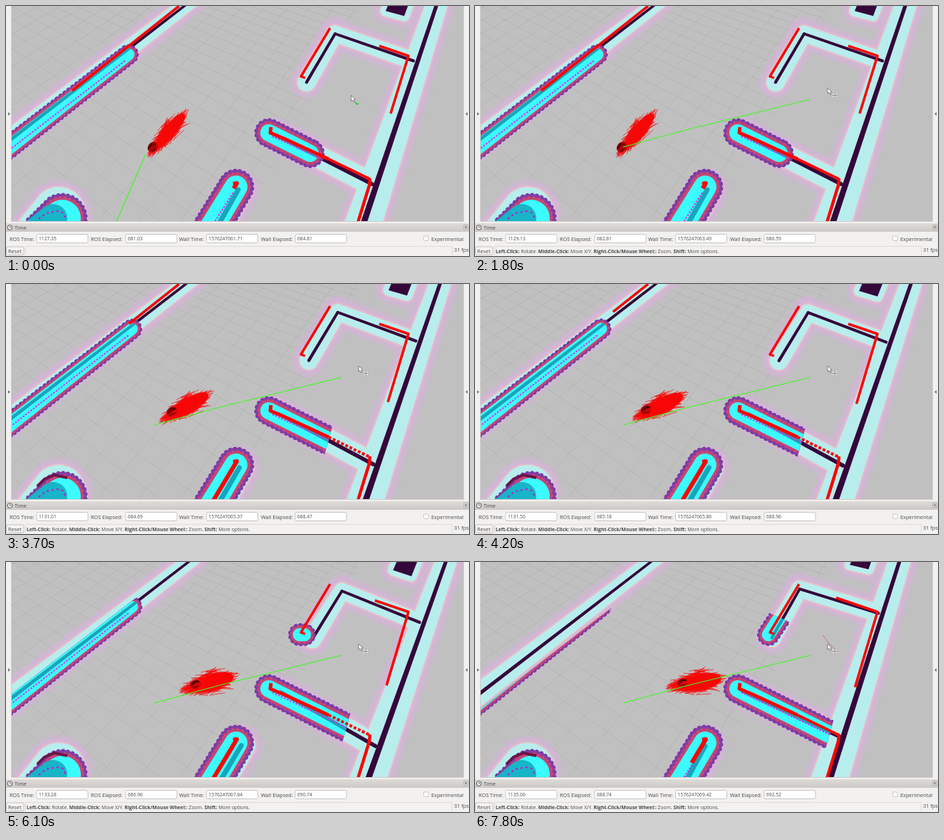
An HTML page with a canvas that plays this animation: 650 px wide and 351 px high, repeating every 8 s.

```html
<!DOCTYPE html>
<html lang="en">
<head>
<meta charset="utf-8">
<title>Robot navigation</title>
<style>
html, body { margin: 0; width: 100%; height: 100%; overflow: hidden; background: #f2f1f0; }
canvas, svg { position: absolute; left: 0; top: 0; display: block; }
text { font: 7.3px "Open Sans", "Noto Sans", sans-serif; fill: #4a4a4a; white-space: pre; }
.value { font-size: 6.7px; }
.status { font-size: 6.8px; }
.field { fill: #fff; stroke: #bdb8b3; stroke-width: .8; }
</style>
</head>
<body>
<canvas id="scene" width="650" height="302"></canvas>
<svg width="650" height="351" viewBox="0 0 650 351">
  <defs>
    <linearGradient id="bar" x2="0" y2="1"><stop stop-color="#dedbd8"/><stop offset="1" stop-color="#cbc8c5"/></linearGradient>
  </defs>
  <path fill="#f2f1f0" d="M0 0H7.5V302H0zM642 0H650V302H642zM0 302H650V351H0z"/>
  <path fill="none" stroke="#cfccc9" d="M7.5 0V302.5H642.5V0"/>
  <path fill="#777" d="M3 149l3 2.5-3 2.5zM648 149l-3 2.5 3 2.5z"/>
  <rect y="305" width="650" height="12" fill="url(#bar)"/>
  <circle cx="5.5" cy="311" r="3.4" fill="#eee" stroke="#555"/>
  <path d="M5.5 309V311H7.3" fill="none" stroke="#555" stroke-width=".8"/>
  <text x="12" y="314">Time</text>
  <rect x="642.5" y="307.5" width="6" height="6" rx="1" fill="#e8e6e4" stroke="#999" stroke-width=".7"/>
  <path d="M644 309l3 3m0-3l-3 3" stroke="#444"/>
  <g id="clocks"></g>
  <rect class="field" x="586.5" y="323" width="6.5" height="6.5" rx="1"/>
  <text x="597" y="329.5">Experimental</text>
  <rect x=".5" y="338" width="24.5" height="11.5" rx="2" fill="#f5f4f3" stroke="#b5b0ab" stroke-width=".8"/>
  <text x="3" y="347">Reset</text>
  <path d="M27.5 350V337.5H626.5V350" fill="none" stroke="#dedbd8"/>
  <text class="status" id="hint" x="29" y="347"><tspan font-weight="bold">Left-Click:</tspan> Rotate. <tspan font-weight="bold">Middle-Click:</tspan> Move X/Y. <tspan font-weight="bold">Right-Click/Mouse Wheel::</tspan> Zoom. <tspan font-weight="bold">Shift:</tspan> More options.</text>
  <text x="629" y="345">31 fps</text>
</svg>
<script>
const LOOP = 8000, TAU = Math.PI * 2, RED = '#fa0505';
const ctx = document.getElementById('scene').getContext('2d');
const hint = document.getElementById('hint');

// Label, label x, field x, value when the loop starts.
const clocks = [
  ['ROS Time:', 5, 43, 1127.35],
  ['ROS Elapsed:', 119, 168, 681.03],
  ['Wall Time:', 243, 281.5, 1576247061.71],
  ['Wall Elapsed:', 358, 406, 684.81]
];
document.getElementById('clocks').innerHTML = clocks.map(([label, x, box]) =>
  `<text x="${x}" y="329.5">${label}</text><rect class="field" x="${box}" y="320.5" width="72" height="12" rx="2"/>` +
  `<text class="value" x="${box + 3}" y="329"></text>`).join('');
const values = document.querySelectorAll('.value');

const lerp = (a, b, p) => a + (b - a) * p;
const clamp = p => Math.max(0, Math.min(1, p));
const decay = (s, rate) => Math.exp(-rate * s);

// The viewer refreshes quickly, stalls, then goes on at half the rate.
function lastRefresh(t) {
  if (t < 3700) return Math.min(2400, Math.floor(t / 100) * 100);
  return Math.max(3700, Math.floor(t / 200) * 200);
}

function random(seed) {
  return () => (seed = (seed * 16807) % 2147483647) / 2147483647;
}

function line(points, color, width, dash = []) {
  ctx.beginPath();
  points.forEach(p => ctx.lineTo(...p));
  ctx.strokeStyle = color;
  ctx.lineWidth = width;
  ctx.setLineDash(dash);
  ctx.stroke();
  ctx.setLineDash([]);
}

function polygon(points) {
  const path = new Path2D();
  points.forEach(p => path.lineTo(...p));
  path.closePath();
  return path;
}

function ellipse(x, y, rx, ry, turn = 0) {
  const path = new Path2D();
  path.ellipse(x, y, rx, ry, turn, 0, TAU);
  return path;
}

function fill(path, color) {
  ctx.fillStyle = color;
  ctx.fill(path);
}

// Rounded, tapering bar; grow is added to both radii.
function pill([x1, y1, r1, x2, y2, r2], grow = 0) {
  const a = Math.atan2(y2 - y1, x2 - x1), q = Math.PI / 2, path = new Path2D();
  path.arc(x2, y2, Math.max(.5, r2 + grow), a - q, a + q);
  path.arc(x1, y1, Math.max(.5, r1 + grow), a + q, a + 3 * q);
  path.closePath();
  return path;
}

function within(path, draw) {
  ctx.save();
  ctx.clip(path);
  draw();
  ctx.restore();
}

// Walls as end points; thickness follows from the depth.
const wallEnds = [
  [-20, 208, 262, -9],
  [613, -27, 494, 329, 1.45],
  [462, 39, 572, 77],
  [462, 39, 422, 107],
  [380, 182, 514, 250],
  [326, 258, 288, 325, 1.2]
];
const block = [[540, -10], [568, -10], [559, 14], [533, 7]];
const mound = [44, 322, 33, 74, 291, 37];
const depth = y => 10.5 + .023 * y;

// Localisation corrections turn the map slightly about the robot.
function warp(x, y, k) {
  if (x < 270) return [x + 6 * k, y];
  return [x + k * (11 - .025 * y), y + k * (.05 * (x - 440) + .02 * y)];
}

function placeWalls(k) {
  return wallEnds.map(([x1, y1, x2, y2, scale = 1]) => {
    const bar = share => [...warp(x1, y1, k), share * scale * depth(y1), ...warp(x2, y2, k), share * scale * depth(y2)];
    return { band: bar(1), core: bar(.17) };
  });
}

function drawGrid() {
  within(polygon([[0, 0], [500, 0], [445, 110], [330, 302], [0, 302]]), () => {
    for (let x = -800; x < 1500; x += 58) {
      line([[727, -370], [x, 302]], 'rgba(90,90,90,.16)', .7);
      line([[-622, -340], [x + 30, 302]], 'rgba(90,90,90,.16)', .7);
    }
  });
}

function drawMap(walls, k) {
  const bars = [mound, ...walls.map(w => w.band)];
  const slab = polygon(block.map(p => warp(...p, k)));
  const layers = [[13, 'rgba(212,180,215,.25)'], [9, 'rgba(212,180,215,.55)'], [6, '#d3b6d5'], [2, '#e9bcc8'], [0, '#b8eded']];
  ctx.lineJoin = 'round';
  for (const [grow, color] of layers) {
    bars.forEach(bar => fill(pill(bar, grow), color));
    ctx.strokeStyle = color;
    ctx.lineWidth = 15 + 2 * grow;
    ctx.stroke(slab);
  }
  walls.forEach(w => fill(pill(w.core), '#35063a'));
  fill(slab, '#35063a');
  ctx.lineJoin = 'miter';
}

// Local cost field around an obstacle.
function drawCost(bar, walls, dots) {
  const ring = Math.min(9, .4 * bar[5]);
  const rim = (grow, color, edge, dash) => {
    const path = pill(bar, grow);
    fill(path, color);
    ctx.strokeStyle = edge;
    ctx.lineWidth = 2.4;
    ctx.setLineDash(dash);
    ctx.stroke(path);
    ctx.setLineDash([]);
  };
  rim(-.8, '#8040a6', '#7b35a0', [4, 3]);
  rim(-ring * .6, '#c54474', '#dc4560', [3, 4]);
  const inner = pill(bar, -ring);
  fill(inner, '#3cfbfd');
  within(inner, () => {
    walls.forEach(w => fill(pill(w.core), '#18a5bb'));
    if (dots) line(dots, '#e424ec', 2, [2.5, 2]);
  });
}

// s is the driving time in seconds; the local window travels with the robot.
function drawLocal(s, walls) {
  const endX = 172 + 5 * clamp(s / 2), endY = 240 - endX;
  const cut = -16 + 9.3 * Math.max(0, s - 3.2);
  const edge = (along, off) => [endX + .79 * along + .61 * off, endY - .61 * along + .79 * off];
  within(polygon([edge(-300, cut), edge(60, cut), edge(60, 60), edge(-300, 60)]), () =>
    drawCost([-20, 217, 16, endX, endY, 14], walls, [edge(-260, 4), edge(-8, 4)]));

  const right = Math.max(452, 431 + 12.5 * s), reach = 80 * Math.max(0, s - .6);
  within(polygon([[330, 140], [right + 20, 140], [right - 16, 270], [330, 270]]), () =>
    drawCost([369, 178, 20, 427 + reach, 207 + reach / 2, 20], walls, [[374, 183], [right, 219 + (right - 452) / 2]]));

  drawCost([280, 325, 26, 323, 254, 25], walls, [[319, 262], [291, 306]]);

  drawCost([52, 318, 30, 79, 298, 35], []);
  fill(pill([42, 316, 19, 66, 298, 20]), '#18b4c8');
  if (s > 1.5) line([[44, 284], [54, 274], [68, 268], [86, 272]], '#6c1448', 4);
  line([[46, 299], [56, 291], [72, 288], [80, 290], [84, 299]], '#c414cc', 2, [3, 4]);

  if (s > 2.7) {
    const grown = clamp((s - 4.2) / 1.8);
    within(polygon([[380, 57], [452, 89], [452, 130], [380, 130]]), () =>
      drawCost([412, 102, 15.5, lerp(419, 437, grown), lerp(102, 64, grown), 15.5], walls));
  }
}

function drawScan(s) {
  ctx.lineJoin = 'round';
  const leftX = 93 + 42 * s;
  if (leftX < 243) line([[leftX, 119 - (leftX - 93) * .793], [243, 0]], RED, 3.6);

  const topX = 524 - 17 * clamp((s - 3.2) / 2.8), lowY = 151 + 27 * (1 - decay(s, .42));
  line([[455, 31], [414, 99], [420, 101]], RED, 3.4);
  line([[topX, 70 - (565 - topX) * .34], [565, 70], [540 - .26 * (lowY - 151), lowY]], RED, 3.6);

  line([[372, 170], [371, 178], [390, 186], [453, 215]], RED, 5);
  line([[453, 215], [511, 243]], RED, 4, s > 1.8 && s < 5.3 ? [4, 2.5] : []);
  line([[511, 242], [510, 252], [494, 304]], RED, 4.4);

  const reach = clamp(.13 + .5 * s) - .4 * clamp(s - 5);
  line([[319, 250], [324, 249], [lerp(324, 291, reach), lerp(249, 304, reach)]], RED, 6);
  ctx.lineJoin = 'miter';
}

function drawRobot(s) {
  const x = 206 + 14.3 * s, y = 169 + 29 * decay(s, .55);
  const turn = -.86 * decay(s, .27), width = 11 + 4 * clamp(s / 4);
  const rnd = random(4711), spread = () => rnd() + rnd() + rnd() - 1.5;

  const spikes = count => {
    ctx.beginPath();
    for (let i = 0; i < count; i++) {
      const u = spread() * 30 - 9, v = spread() * width * (1 - Math.abs(u) / 70);
      const a = spread() * .35, len = 12 + rnd() * 14;
      ctx.moveTo(u - len / 2, v - len * Math.sin(a) / 2);
      ctx.lineTo(u + len * Math.cos(a) / 2, v + len * Math.sin(a) / 2);
    }
    ctx.strokeStyle = '#f80808';
    ctx.lineWidth = .65;
    ctx.stroke();
  };
  const cloud = draw => {
    ctx.save();
    ctx.translate(x + 26, 168 + 5 * decay(s, 1));
    ctx.rotate(turn);
    draw();
    ctx.restore();
  };
  cloud(() => {
    fill(ellipse(6, 0, 22, width * .7), '#ff0000');
    spikes(380);
  });
  fill(ellipse(x, y, 8, 6.5, turn), '#8c0606');
  line([[x - 6, y + 2], [x - 1, y - 4], [x + 5, y - 3]], '#400404', 2);
  line([[x - 3, y + 4], [x + 4, y + 3]], '#500404', 1.5);
  cloud(() => spikes(50));
}

function drawGoal(t) {
  const path = t < 1700 ? [[196, 208], [190, 222], [155, 303]] : [[208, 198], [300, 173], [471, 131]];
  line(path, '#3cfa1e', 1.2);
  if (t < 400) line([[490, 135], [493, 138], [495, 137]], '#20d020', 1.6);
  if (t >= 500 && t < 1400) {
    ctx.save();
    ctx.translate(471, 131);
    ctx.rotate(lerp(-.1, -.64, clamp((t - 500) / 600)));
    line([[0, 0], [56, 0]], '#12c412', 4);
    line([[0, 1.5], [56, 1.5]], '#0a8a0a', 1.2);
    fill(polygon([[53, -5], [63, 0], [53, 5]]), '#087008');
    ctx.restore();
  }
  if (t >= 7800) line([[488, 102], [496, 113], [508, 125]], '#d86060', .8);
}

function drawCursor(t) {
  const go = clamp(t / 400), drag = clamp((t - 500) / 600);
  ctx.save();
  ctx.translate(lerp(lerp(484.5, 471, go), 495, drag), lerp(lerp(125.5, 131, go), 115, drag));
  const arrow = polygon([[0, 0], [0, 8], [2, 6.5], [3.5, 9.5], [5, 9], [3.7, 6], [6, 5.7]]);
  fill(arrow, '#fff');
  ctx.strokeStyle = '#666';
  ctx.lineWidth = .8;
  ctx.stroke(arrow);
  if (t >= 400) {
    ctx.strokeStyle = '#f4f4f4';
    ctx.strokeRect(8, 8.5, 4.5, 4);
    line([[6.5, 10.5], [14, 10.5]], '#888', .7);
    line([[10.2, 7], [10.2, 14]], '#888', .7);
  }
  ctx.restore();
}

function draw(now) {
  const t = lastRefresh(now % LOOP);
  const s = Math.max(0, t - 1800) / 1000;
  const k = Math.sin(Math.PI * (s / 5.45) ** 2);
  const walls = placeWalls(k);
  ctx.fillStyle = '#c0c0c0';
  ctx.fillRect(0, 0, 650, 302);
  drawGrid();
  drawMap(walls, k);
  drawLocal(s, walls);
  drawScan(s);
  drawRobot(s);
  drawGoal(t);
  drawCursor(t);

  clocks.forEach(([, , , from], i) => { values[i].textContent = (from + t * .000988).toFixed(2); });
  hint.style.visibility = t >= 1400 ? 'visible' : 'hidden';
}

const start = performance.now();
function tick() {
  draw(performance.now() - start);
  requestAnimationFrame(tick);
}
tick();
</script>
</body>
</html>
```
